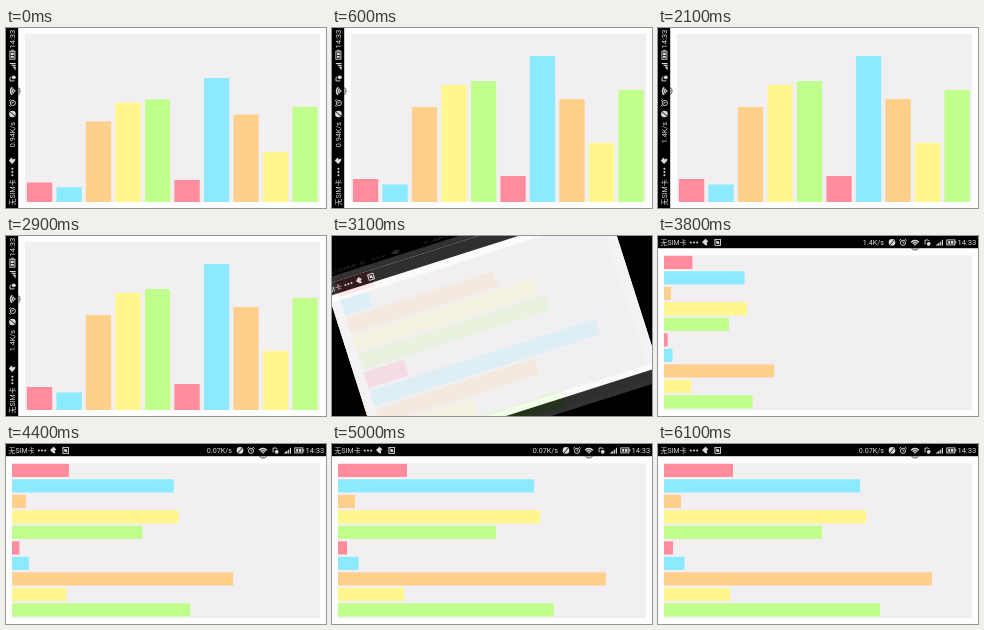
An HTML page with a canvas for the animation above (6.2 s loop, 320 by 180 pixels).

```html
<!DOCTYPE html>
<html>
<head>
<meta charset="utf-8">
<style>
  html, body { margin: 0; width: 100%; height: 100%; overflow: hidden; background: #000; }
  canvas { display: block; width: 100vw; height: 100vh; }
</style>
</head>
<body>
<canvas id="stage" width="320" height="180"></canvas>
<script>
const W = 320, H = 180, LOOP = 6200, STEP = 100;
const TURN_START = 3000, TURN_TIME = 360, GROW_TIME = 2123;
const COLORS = ['#ff8c9d', '#8ceaff', '#ffd08c', '#fff78c', '#c0ff8c'];
const PORTRAIT = [23, 17.5, 95, 117, 121, 26, 146, 103, 59, 112];
const LANDSCAPE = [69, 196, 17, 202, 158, 9, 20.5, 268, 66, 216];
const INK = '#dcdcdc';

const stage = document.getElementById('stage').getContext('2d');
const layer = document.createElement('canvas');
layer.width = W;
layer.height = H;
const layerCtx = layer.getContext('2d');
let ctx = stage;

const clamp = v => Math.max(0, Math.min(1, v));
const grow = (t, start) => (1 - Math.cos(Math.PI * clamp((t - start) / GROW_TIME))) / 2;

function rect(x, y, w, h, color) {
  ctx.fillStyle = color;
  ctx.fillRect(x, y, w, h);
}

function label(text, x, size, align = 'left') {
  ctx.font = `${size}px Roboto, "Noto Sans CJK SC", "Noto Sans CJK", sans-serif`;
  ctx.textAlign = align;
  ctx.textBaseline = 'alphabetic';
  ctx.fillStyle = INK;
  ctx.fillText(text, x, 9.2);
}

function line(...points) {
  ctx.beginPath();
  for (let i = 0; i < points.length; i += 2) ctx.lineTo(points[i], points[i + 1]);
  ctx.stroke();
}

function shape(...points) {
  ctx.beginPath();
  for (let i = 0; i < points.length; i += 2) ctx.lineTo(points[i], points[i + 1]);
  ctx.fill();
}

function arc(x, y, r) {
  ctx.beginPath();
  ctx.arc(x, y, r, 0, Math.PI * 2);
  ctx.stroke();
}

function dot(x, y, r) {
  ctx.beginPath();
  ctx.arc(x, y, r, 0, Math.PI * 2);
  ctx.fill();
}

function statusIcons(right) {
  const at = (offset, draw) => {
    ctx.save();
    ctx.translate(right - offset, 6.4);
    draw();
    ctx.restore();
  };
  // muted
  at(86, () => {
    dot(0, 0, 3.3);
    ctx.strokeStyle = '#000';
    line(-2, 2.6, 2.2, -2.4);
  });
  // alarm
  at(75, () => {
    arc(0, 0.4, 2.6);
    line(0, -1, 0, 0.6, 1.3, 0.6);
    line(-3.6, -1.9, -1.9, -3.3);
    line(3.6, -1.9, 1.9, -3.3);
  });
  // wireless
  at(63, () => {
    ctx.beginPath();
    ctx.moveTo(0, 3.4);
    ctx.arc(0, 3.4, 6, -Math.PI * 0.76, -Math.PI * 0.24);
    ctx.fill();
    ctx.strokeStyle = '#000';
    ctx.lineWidth = 0.7;
    for (const r of [2.2, 4.2]) arc(0, 3.4, r);
  });
  // missing card
  at(50.5, () => {
    line(-2.4, 2, -2.4, -2.4, 0.8, -2.4, 2, -1);
    dot(1.2, 1.4, 1.9);
  });
  // signal
  at(38.5, () => {
    shape(-4, 3.2, 0, 0.2, 0, 3.2);
    ctx.fillRect(0.6, -0.8, 1.1, 4);
    ctx.fillRect(2.4, -2.6, 1.1, 5.8);
  });
  // battery
  at(27, () => {
    ctx.strokeRect(-4.2, -2.5, 8, 5);
    ctx.fillRect(4.2, -1.2, 1, 2.4);
    ctx.fillRect(-2.8, -1.4, 2, 2.8);
    ctx.fillRect(0, -1.4, 2.4, 2.8);
  });
}

function statusBar(width, speed, extraIcon) {
  rect(0, 0, width, 12.2, '#000');
  ctx.strokeStyle = ctx.fillStyle = INK;
  ctx.lineWidth = 0.9;
  label('无SIM卡', 2.5, 7);
  for (let i = 0; i < 3; i++) dot(32.8 + i * 3.2, 6.4, 1);
  shape(44, 6, 47.5, 2.8, 50.4, 5.6, 48.6, 6.8, 49.4, 9.4, 47, 9);
  if (extraIcon) {
    ctx.strokeRect(56.9, 3.4, 5.6, 6);
    dot(59.7, 6.4, 1.5);
    line(57.7, 4.4, 61.7, 8.4);
  }
  label(speed, width - 94, 7.2, 'right');
  statusIcons(width);
  label('14:33', width - 1.7, 7.6, 'right');
}

function portraitScreen(t) {
  rect(0, 0, W, H, '#fdfdfd');
  rect(19, 6, 295, 168, '#f1eff2');
  const scale = grow(t, 540 - GROW_TIME);
  PORTRAIT.forEach((v, i) =>
    rect(20.9 + 29.5 * i, 174 - v * scale, 25.3, v * scale, COLORS[i % 5]));
  ctx.save();
  ctx.translate(0, H);
  ctx.rotate(-Math.PI / 2);
  statusBar(H, t < 1800 ? '0.94K/s' : '1.4K/s', false);
  ctx.restore();
}

function landscapeScreen(t) {
  rect(0, 0, W, H, '#fdfdfd');
  rect(6, 19.5, 308, 154.5, '#f1eff2');
  const scale = grow(t, 2860);
  LANDSCAPE.forEach((v, i) =>
    rect(6, 19.8 + 15.5 * i, v * scale, 13.2, COLORS[i % 5]));
  statusBar(W, t < 4100 ? '1.4K/s' : '0.07K/s', true);
}

function turn(angle, sx = 1, sy = 1) {
  ctx.translate(W / 2, H / 2);
  ctx.rotate(angle);
  ctx.scale(sx, sy);
  ctx.translate(-W / 2, -H / 2);
}

// The old screen stretches, turns and fades; the new one shows only inside its outline.
function rotation(t, p) {
  ctx = layerCtx;
  portraitScreen(t);
  ctx = stage;

  const quarter = Math.PI / 2;
  const turnOld = () => turn(quarter * p, 1 + (H / W - 1) * p, 1 + (W / H - 1) * p);

  ctx.save();
  turnOld();
  ctx.beginPath();
  ctx.rect(0, 0, W, H);
  ctx.resetTransform();
  ctx.clip();
  turn(-quarter * (1 - p));
  landscapeScreen(t);
  ctx.restore();

  ctx.save();
  turnOld();
  ctx.globalAlpha = 1 - p;
  ctx.drawImage(layer, 0, 0);
  ctx.restore();
}

function render(t) {
  rect(0, 0, W, H, '#000');
  const p = 1 - Math.pow(1 - clamp((t - TURN_START) / TURN_TIME), 5);
  if (p === 0) portraitScreen(t);
  else if (p === 1) landscapeScreen(t);
  else rotation(t, p);
}

const start = performance.now();
function frame() {
  const t = (performance.now() - start) % LOOP;
  render(Math.floor(t / STEP) * STEP);
  requestAnimationFrame(frame);
}
frame();
</script>
</body>
</html>
```
